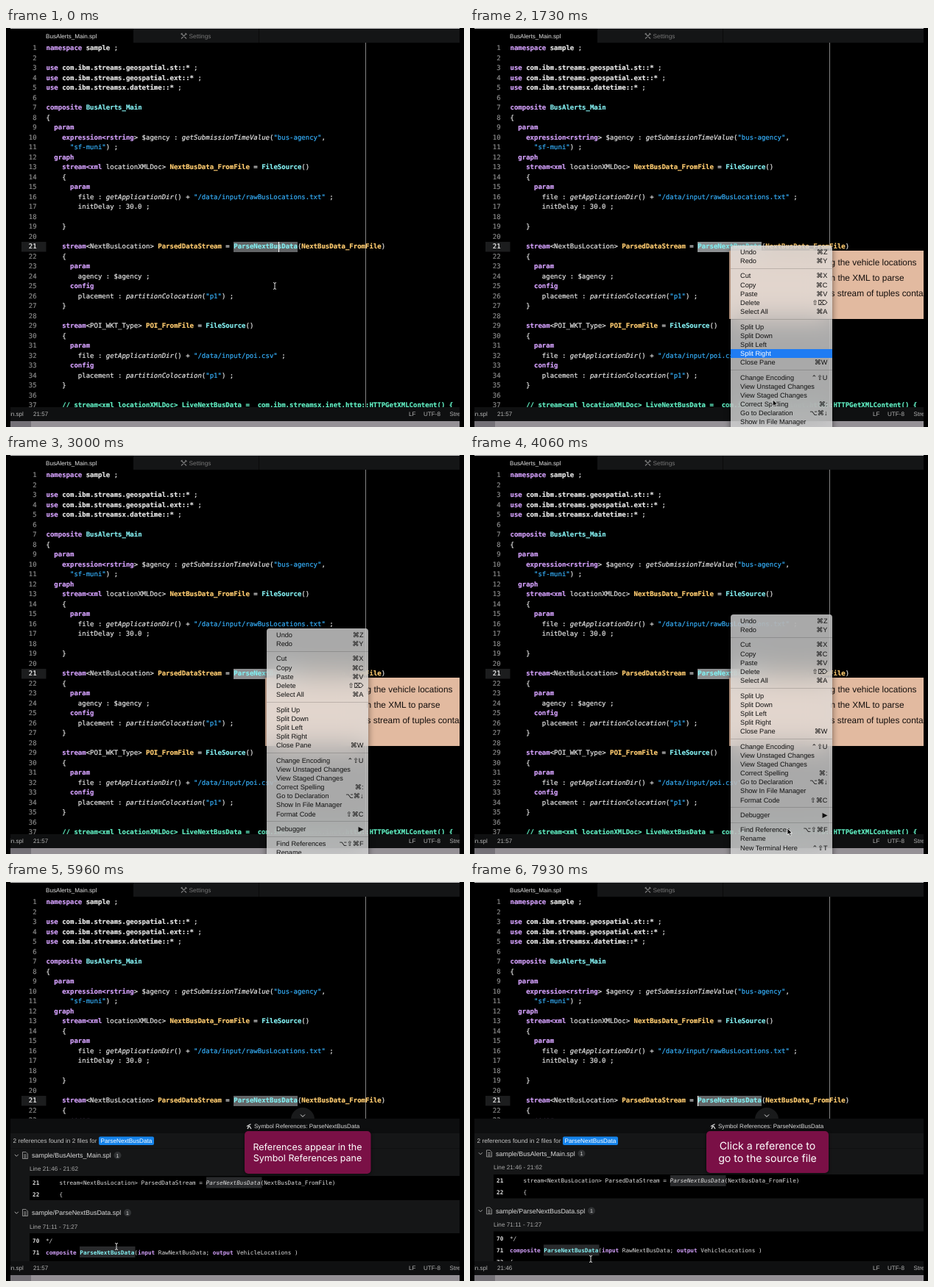
Recreate the animation shown at these times as an HTML page. Size 622 by 543 pixels, loop 8000 ms.

```html
<!DOCTYPE html>
<html lang="en">
<head>
<meta charset="utf-8">
<title>Find references</title>
<style>
html, body { margin: 0; width: 622px; height: 543px; overflow: hidden; background: #000; }
body { position: relative; font: 8.2px "Liberation Sans", "DejaVu Sans", sans-serif; text-rendering: geometricPrecision; }
body > * { position: absolute; margin: 0; }
svg { left: 0; top: 0; }
text { white-space: pre; }

/* editor */
pre, .mono { font-family: "DejaVu Sans Mono", monospace; }
pre { top: 22px; height: 494px; overflow: hidden; font-size: 9px; line-height: 13.5px; color: #e8e8e8; -webkit-text-stroke: .2px; }
#nums { left: 0; width: 41.6px; text-align: right; color: #8a8a8a; }
#nums b { font-weight: 400; color: #fff; }
#code { left: 54.5px; width: 561.5px; }
.k, .n, .o, .w, .c { font-weight: 700; }
.k { color: #d3a0fb; fill: #d3a0fb; }
.n { color: #83eef0; fill: #83eef0; }
.o { color: #ffcc70; }
.s { color: #35aef8; }
.c { color: #62efc4; }
.f { font-style: italic; }
#word { left: 309px; top: 291px; width: 87px; height: 13.5px; background: #626466; animation: word 8s step-end infinite; }
.caret { top: 291px; width: 1px; height: 13.5px; background: #fff; }
#caretA { left: 369.5px; }
#caretB { left: 308.5px; }

#popup { left: 352px; top: 303px; width: 264px; height: 93px; overflow: hidden; background: #e2baa0; color: #15100e; }
#popup div { position: absolute; left: 137.5px; top: 6.2px; font-size: 11.9px; line-height: 20.7px; white-space: pre; }

/* context menu */
#menu { left: 354px; top: 296px; width: 137.5px; padding: 3px 0 30px; border-radius: 4px; color: #111; font-size: 9.2px;
  background: rgba(222, 222, 222, .76); backdrop-filter: blur(18px) saturate(1.3); box-shadow: 0 3px 9px rgba(0, 0, 0, .5);
  animation: menuTop 8s step-end infinite, menuFade 8s linear infinite; }
.row { display: flex; justify-content: space-between; height: 12.2px; padding: 0 6px 0 13px; line-height: 12.2px; white-space: pre;
  animation: hot 8s step-end var(--at) infinite; }
.sep { height: 1px; margin: 3.5px 0 3.6px; background: rgba(0, 0, 0, .16); }

/* timeline */
.step { animation: 8s step-end infinite; }
.fade { animation: 8s linear infinite; }
@keyframes word { 0% { background: #626466 } 11.25% { background: #8d9092 } 57%, 100% { background: #626466 } }
@keyframes first { 0% { opacity: 1 } 7.5%, 100% { opacity: 0 } }
@keyframes blink { 0% { opacity: 0 } 87.5% { opacity: 1 } 92% { opacity: 0 } 97%, 100% { opacity: 1 } }
@keyframes popup { 0% { opacity: 0 } 11.25% { opacity: 1 } 57%, 100% { opacity: 0 } }
@keyframes pane { 0% { opacity: 0 } 57%, 100% { opacity: 1 } }
@keyframes spinner { 0% { opacity: 1 } 64%, 100% { opacity: 0 } }
@keyframes results { 0% { opacity: 0 } 64%, 100% { opacity: 1 } }
@keyframes before { 0% { opacity: 1 } 87.5%, 100% { opacity: 0 } }
@keyframes after { 0% { opacity: 0 } 87.5%, 100% { opacity: 1 } }
@keyframes menuTop { 0% { top: 296px } 27.5% { top: 284px } 33% { top: 272px } 34.5% { top: 260px } 36% { top: 248px }
  37.5% { top: 236px } 39% { top: 224px } 40%, 100% { top: 217px } }
@keyframes menuFade { 0%, 7.49% { opacity: 0 } 7.5%, 52.5% { opacity: 1 } 54.5%, 100% { opacity: 0 } }
@keyframes hot { 0% { background: #1f7cf3; color: #fff } 1.25%, 100% { background: none; color: #111 } }
@keyframes callA { 0%, 64% { opacity: 0 } 67% { opacity: 1 } 87% { opacity: 1 } 88.75%, 100% { opacity: 0 } }
@keyframes callB { 0%, 94.5% { opacity: 0 } 97.5%, 100% { opacity: 1 } }
@keyframes scroll { 0%, 95% { transform: none } 97%, 100% { transform: translateY(-2.5px) } }
@keyframes turn { to { transform: rotate(360deg) } }
@keyframes beam { 0% { opacity: 1 } 7.5% { opacity: 0 } 61.25%, 100% { opacity: 1 } }
@keyframes arrow { 0% { opacity: 0 } 7.5% { opacity: 1 } 61.25%, 100% { opacity: 0 } }
@keyframes mouse {
  0%, 3% { transform: translate(365px, 351px) }
  6.5%, 8% { transform: translate(356px, 298px) }
  11.25% { transform: translate(372px, 340px) }
  15% { transform: translate(388px, 410px) }
  21.25% { transform: translate(410px, 500px) }
  24.4% { transform: translate(420px, 546px) }
  41.6% { transform: translate(432px, 548px) }
  45% { transform: translate(432px, 530px) }
  50%, 61.25% { transform: translate(431px, 508px) }
  67.5% { transform: translate(316px, 490px) }
  74%, 74.8% { transform: translate(150px, 496px) }
  77.5% { transform: translate(148px, 465px) }
  83.75%, 95% { transform: translate(145px, 410px) }
  99%, 100% { transform: translate(164px, 513px) }
}
#spin { animation: turn 1s linear -.44s infinite; }
.call { font-family: Inter, "Open Sans", sans-serif; text-anchor: middle; fill: #fff; filter: drop-shadow(0 1px 2px rgba(0, 0, 0, .6)); }
.call rect { fill: #7a1046; }
</style>
</head>
<body>
<svg width="622" height="543" fill="#b4b4b4">
  <path d="M6 0H616V1H6Z" fill="#c8c8c8"/>
  <path d="M173 1H616V20H173Z" fill="#141516"/>
  <path d="M343.5 1V20" stroke="#0a0a0a"/>
  <text x="54" y="13.7" font-size="8.12" fill="#e4e4e4">BusAlerts_Main.spl</text>
  <path d="M238 7.5L245 14.5M245 7.5L238 14.5M237.5 8.5L239.5 7M243.5 7L245.5 9" stroke="#777" stroke-width="1.3"/>
  <text x="248.5" y="13.7" font-size="8.3" fill="#777">Settings</text>
  <path d="M488.5 20V516" stroke="#858585"/>
  <path d="M21 291H54.5V304.5H21Z" fill="#1c1d1e"/>
  <path d="M6 516H616V535H6Z" fill="#0f1011"/>
  <path d="M6 535H34V543H6Z" fill="#747177"/>
  <path d="M34 535H616V543H34Z" fill="#959196"/>
  <svg x="6" width="610" height="543" font-size="8.1">
    <text x="-1" y="528.2">in.spl</text>
    <text class="step" style="animation-name:before" x="31" y="528.2">21:57</text>
    <text class="step" style="animation-name:after" x="31" y="528.2">21:46</text>
    <text x="541" y="528.2">LF</text>
    <text x="561" y="528.2">UTF-8</text>
    <text x="596.5" y="528.2">Streams</text>
  </svg>
</svg>

<div id="word"></div>
<pre id="nums"></pre>
<pre id="code">namespace sample ;

use com.ibm.streams.geospatial.st::* ;
use com.ibm.streams.geospatial.ext::* ;
use com.ibm.streamsx.datetime::* ;

composite BusAlerts_Main
{
  param
    expression&lt;rstring> $agency : getSubmissionTimeValue("bus-agency",
      "sf-muni") ;
  graph
    stream&lt;xml locationXMLDoc> NextBusData_FromFile = FileSource()
    {
      param
        file : getApplicationDir() + "/data/input/rawBusLocations.txt" ;
        initDelay : 30.0 ;

    }

    stream&lt;NextBusLocation> ParsedDataStream = ParseNextBusData(NextBusData_FromFile)
    {
      param
        agency : $agency ;
      config
        placement : partitionColocation("p1") ;
    }

    stream&lt;POI_WKT_Type> POI_FromFile = FileSource()
    {
      param
        file : getApplicationDir() + "/data/input/poi.csv" ;
      config
        placement : partitionColocation("p1") ;
    }

    // stream&lt;xml locationXMLDoc> LiveNextBusData =  com.ibm.streamsx.inet.http::HTTPGetXMLContent() {</pre>
<div id="caretA" class="caret step" style="animation-name:first"></div>
<div id="caretB" class="caret step" style="animation-name:blink"></div>

<div id="popup" class="step" style="animation-name:popup"><div>g the vehicle locations
n the XML to parse
s stream of tuples containing</div></div>

<svg class="step" style="animation-name:pane" width="622" height="543" fill="#dcdcdc">
  <clipPath id="list"><path d="M6 362H616V516H6Z"/></clipPath>
  <g class="step" style="animation-name:results">
    <path d="M387 323A16 16 0 0 1 419 323Z" fill="#191a1b"/>
  </g>
  <path d="M6 322H616V342H6Z" fill="#0d0e0f"/>
  <path d="M6 342H616V516H6Z" fill="#151617"/>
  <path d="M6 362.5H616" stroke="#101112"/>
  <path class="step" style="animation-name:results" d="M400 316.5L403 319.5L406 316.5" fill="none" stroke="#ddd"/>
  <path d="M327 332.5L332.5 329.5M330 332L328 336M330.5 332L333 336" stroke="#ddd" stroke-width="1.3"/>
  <text x="337" y="335" font-size="8.05">Symbol References: ParseNextBusData</text>
  <text x="9.5" y="355" font-size="8.3" fill="#c4c4c4">2 references found in 2 files for</text>
  <rect x="126" y="346.5" width="75" height="11.5" rx="2" fill="#1583ea"/>
  <text x="128.5" y="355" font-size="8.23" fill="#fff">ParseNextBusData</text>

  <g class="step" style="animation-name:spinner">
    <g transform="translate(403 379)" fill="none" stroke-width="1.4">
      <g id="spin">
        <path d="M-11-10.2A15 15 0 0 1 9.6-11.5" stroke="#3f78e0"/>
        <path d="M9.6-11.5A15 15 0 0 1 10.6 10.6" stroke="#a9bfee"/>
      </g>
      <circle r="3.4" fill="#4c86ee"/>
    </g>
  </g>

  <g clip-path="url(#list)"><g class="step" style="animation-name:results"><g class="fade" style="animation-name:scroll">
    <defs>
      <g id="head" fill="none" stroke="#a8a8a8">
        <path d="M11.8-1.2L14.3 1.3L16.8-1.2"/>
        <path d="M22.5-4.5H27L29.5-2V4.5H22.5ZM24-1H28M24 1H28M24 3H28" stroke-width=".8"/>
      </g>
    </defs>
    <g id="files"></g>
    <path d="M32 400H616V433H32ZM32 478H616V540H32Z" fill="#000"/>
    <path d="M272 401.5H347.5V416.5H272ZM100 496H175.5V511H100Z" fill="#292a2c"/>
    <g class="mono" font-size="7.7">
      <g font-weight="700"><text x="36" y="411.7">21</text><text x="36" y="427.7">22</text><text x="36" y="490.5">70</text><text x="36" y="506.7">71</text><text x="36" y="522.7">72</text></g>
      <text x="54" y="411.7">    stream&lt;NextBusLocation> ParsedDataStream = <tspan class="f">ParseNextBusData</tspan>(NextBusData_FromFile)</text>
      <text x="54" y="427.7">    {</text>
      <text x="54" y="490.5" class="f">*/</text>
      <text x="54" y="506.7"><tspan class="k">composite</tspan> <tspan class="n">ParseNextBusData</tspan>(<tspan class="k">input</tspan> RawNextBusData; <tspan class="k">output</tspan> VehicleLocations )</text>
      <text x="54" y="522.7">{</text>
    </g>
  </g></g></g>

  <g class="call fade" style="animation-name:callA" font-size="12.5">
    <rect x="324" y="339" width="171.5" height="58" rx="5"/>
    <text x="409.5" y="364.5">References appear in the</text>
    <text x="409.5" y="379.5">Symbol References pane</text>
  </g>
  <g class="call fade" style="animation-name:callB" font-size="14.2">
    <rect x="321" y="339" width="166" height="57" rx="5"/>
    <text x="404" y="364">Click a reference to</text>
    <text x="404" y="381">go to the source file</text>
  </g>
</svg>

<div id="menu"></div>

<svg width="622" height="543">
  <g class="fade" style="animation-name:mouse">
    <path class="step" style="animation-name:beam" d="M-2-4.5Q0-4.5 0-3Q0-4.5 2-4.5M0-3V3M-2 4.5Q0 4.5 0 3Q0 4.5 2 4.5" fill="none" stroke="#ddd"/>
    <path class="step" style="animation-name:arrow" d="M0 0V9L2.1 7.1L3.6 10.4L5.2 9.7L3.7 6.5H6.5Z" stroke="#fff" stroke-width=".8"/>
  </g>
</svg>

<script>
const $ = id => document.getElementById(id);

// syntax colours
const groups = [
  ["c", "\\/\\/.*"],
  ["s", '"[^"]*"'],
  ["w", "com\\.ibm\\S+|\\bsample\\b"],
  ["k", "\\b(?:namespace|use|composite|param|graph|config|expression&lt;rstring|stream(?:&lt;xml)?)\\b"],
  ["n", "BusAlerts_Main|FileSource|ParseNextBusData"],
  ["o", "NextBusData_FromFile|ParsedDataStream|POI_FromFile"],
  ["f", "getSubmissionTimeValue|getApplicationDir|partitionColocation"]
];
const token = new RegExp(groups.map(([name, re]) => `(?<${name}>${re})`).join("|"), "g");
$("code").innerHTML = $("code").innerHTML.replace(token, (text, ...rest) => {
  const found = rest.pop();
  const name = Object.keys(found).find(key => found[key]);
  return `<span class="${name}">${text}</span>`;
});
$("nums").innerHTML = Array.from({ length: 37 }, (_, i) => i === 20 ? "<b>21</b>" : i + 1).join("\n");

// result headings
const heading = (y, file, badge, lines, linesY) => `
  <use href="#head" y="${y}"/>
  <text x="35" y="${y + 3}" font-size="8.95">${file}</text>
  <circle cx="${badge}" cy="${y}" r="5" fill="#303234"/>
  <text x="${badge}" y="${y + 2.6}" font-size="7" text-anchor="middle">1</text>
  <text x="32" y="${linesY + 3}" font-size="8.2" fill="#a8a8a8">Line ${lines}</text>`;
$("files").innerHTML =
  heading(372, "sample/BusAlerts_Main.spl", 151.5, "21:46 - 21:62", 390) +
  heading(450, "sample/ParseNextBusData.spl", 165, "71:11 - 71:27", 468.5);

// menu rows, "-" is a separator; the highlight runs down them
const items = `Undo|⌘Z
Redo|⌘Y
-
Cut|⌘X
Copy|⌘C
Paste|⌘V
Delete|⇧⌦
Select All|⌘A
-
Split Up
Split Down
Split Left
Split Right
Close Pane|⌘W
-
Change Encoding|⌃⇧U
View Unstaged Changes
View Staged Changes
Correct Spelling|⌘:
Go to Declaration|⌥⌘↓
Show In File Manager
Format Code|⇧⌘C
-
Debugger|▶
-
Find References|⌥⇧⌘F
Rename
New Terminal Here|⌃⇧T
Reveal in Tree View|⌘\\`.split("\n");
let row = 0;
$("menu").innerHTML = items.map(item => {
  if (item === "-") return '<div class="sep"></div>';
  const [label, keys = ""] = item.split("|");
  const at = label === "Find References" ? 4200 : 650 + 100 * row;
  row++;
  return `<div class="row" style="--at:${at}ms"><span>${label}</span><span>${keys}</span></div>`;
}).join("");
</script>
</body>
</html>
```
